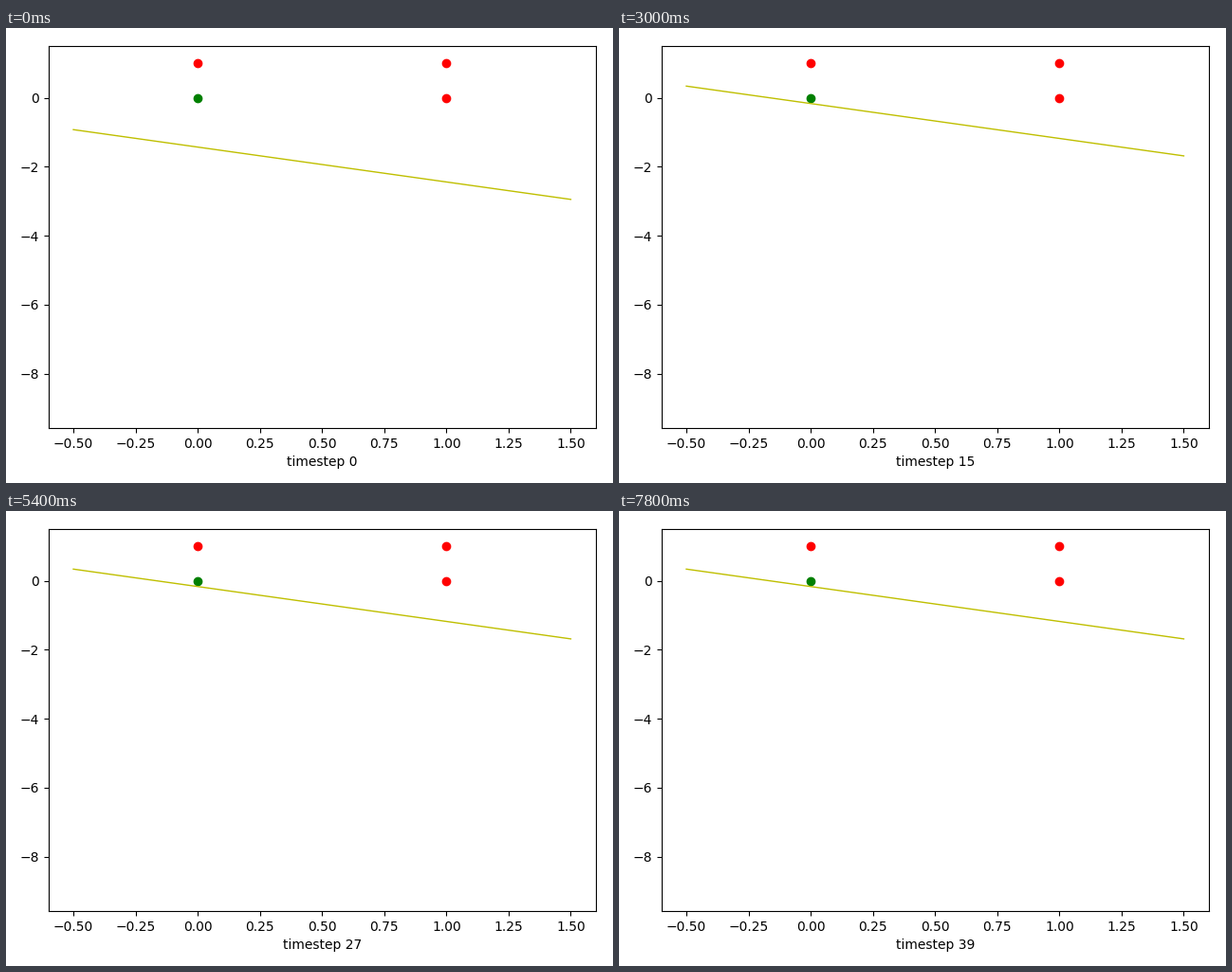
These frames come from a looping animation (640x480 px, 8 s). A matplotlib script:

```python
import matplotlib.pyplot as plt
import numpy as np
from matplotlib.animation import FuncAnimation

W, H, DPI = 640, 480, 100
STEPS, INTERVAL = 40, 200

SLOPE = -1.012
START = -1.429      # intercept at the first timestep
RATE = 0.2525       # intercept change per update
RISE = 5            # updates before the line starts to oscillate

plt.rcParams["font.family"] = "DejaVu Sans"
plt.rcParams["font.size"] = 10

fig = plt.figure(figsize=(W / DPI, H / DPI), dpi=DPI, facecolor="white")
left, right, bottom, top = 44.8, 621.7, 58.05, 461.05
ax = fig.add_axes([left / W, bottom / H, (right - left) / W, (top - bottom) / H])
ax.set_xlim(-0.6, 1.6)
ax.set_ylim(-9.577, 1.504)
ax.set_xticks(np.arange(-0.5, 1.51, 0.25))
ax.set_yticks(range(-8, 1, 2))

# Truth table of OR: green is false, red is true
for a in (0, 1):
    for b in (0, 1):
        ax.plot(a, b, "ro" if a or b else "go")

xs = np.array([-0.5, 1.5])
line, = ax.plot(xs, START + SLOPE * xs, "y-", linewidth=1)


def intercept(step):
    """Climb at a steady rate, then flip between two neighbouring values."""
    updates = step if step <= RISE else RISE + (step - RISE) % 2
    return START + RATE * updates


def update(step):
    line.set_ydata(intercept(step) + SLOPE * xs)
    ax.set_xlabel(f"timestep {step}")
    return line, ax.xaxis.label


anim = FuncAnimation(fig, update, frames=STEPS, interval=INTERVAL,
                     repeat=True, repeat_delay=0)
plt.show()
```
